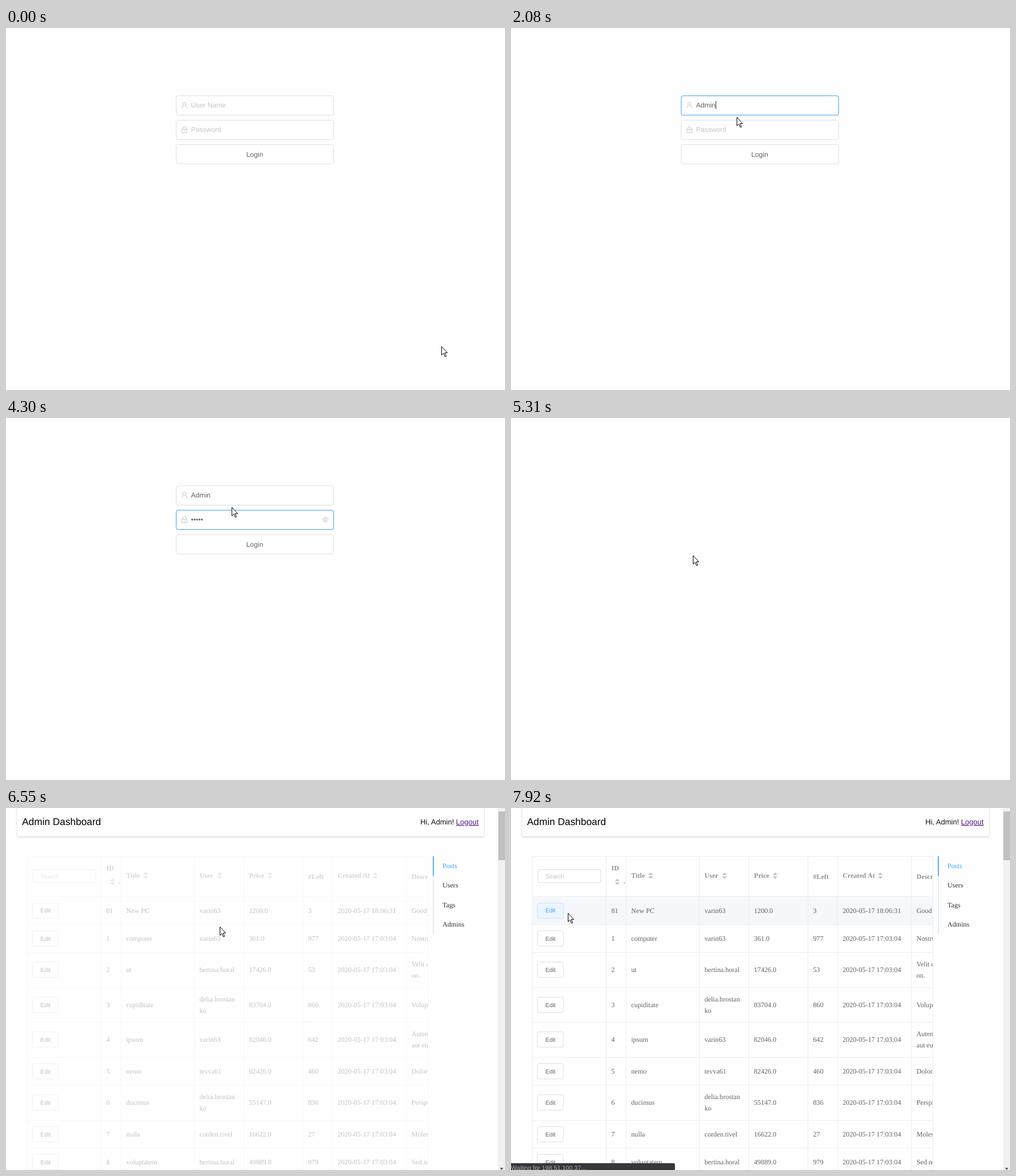
An HTML page that plays this animation: 878 px wide and 638 px high, repeating every 8000 ms.

```html
<!DOCTYPE html>
<html lang="en">
<head>
<meta charset="utf-8">
<title>Admin login</title>
<style>
html, body { margin: 0; width: 100%; height: 100%; overflow: hidden; background: #fefefe; }
svg { display: block; width: 878px; height: 638px; }
text { font: 12.14px "Liberation Sans", Arial, sans-serif; fill: #606266; white-space: pre; text-rendering: geometricPrecision; }
.serif text { font-family: "Liberation Serif", "Times New Roman", serif; }
.serif .head { font-weight: bold; fill: #909399; }
.serif .menu { fill: #303133; }
.serif .on { fill: #409eff; }
.serif .small { font: 10.4px "Liberation Sans", Arial, sans-serif; }
.hint, .serif .hint { fill: #c0c4cc; }
.mid { text-anchor: middle; }
.box { fill: #fff; stroke: #dcdfe6; }
.icon { fill: none; stroke: #c0c4cc; }
.line { fill: none; stroke: #ebeef5; }
.hot rect { fill: #ecf5ff; stroke: #c6e2ff; }
.serif .hot text, .hot text { fill: #409eff; }
.bar { fill: #fff; filter: drop-shadow(0 1.7px 1.7px rgba(0,0,0,.2)); }
.cursor { fill: #fff; stroke: #000; stroke-linejoin: round; }
</style>
</head>
<body>
<svg id="stage" viewBox="0 0 878 638"></svg>
<script>
const stage = document.getElementById('stage');
const $ = id => document.getElementById(id);
const snap = v => Math.floor(v) + .5;
const text = (x, y, s, cls = '', more = '') => `<text x="${x}" y="${Math.round(y)}" class="${cls}" ${more}>${s}</text>`;
const rect = (x, y, w, h, cls, more = '') => `<rect x="${x}" y="${y}" width="${w}" height="${h}" class="${cls}" ${more}/>`;
const path = (d, cls, more = '') => `<path d="${d}" class="${cls}" ${more}/>`;

// ---- login form ----
const field = (name, y, hint, icon) => `
  ${rect(299.5, y + .5, 277, 34, 'box', 'rx="3"')}
  ${rect(299.5, y + .5, 277, 34, '', `rx="3" id="${name}Ring" fill="none"`)}
  ${path(icon, 'icon')}
  ${text(325.5, y + 21, hint, 'hint', `id="${name}Hint"`)}
  ${text(325.5, y + 21, '', '', `id="${name}Text"`)}`;

const login = `<g id="login">
  ${field('user', 119, 'User Name', 'M311 133.7a2.8 2.8 0 1 0 5.6 0a2.8 2.8 0 1 0-5.6 0M309.3 141.2q.4-3.4 3.2-4.4M318.5 141.2q-.4-3.4-3.2-4.4')}
  ${field('pass', 162, 'Password', 'M309.5 178.5h9v6h-9zM311 178.3v-1.5a3 3 0 0 1 6 0v1.5M314 180.3v2.3')}
  ${path('M556.3 179.2q5.6-8.6 11.2 0q-5.6 8.6-11.2 0zM559.9 179.2a2 2 0 1 0 4 0a2 2 0 1 0-4 0', 'icon', 'id="eye"')}
  <g id="loginBtn">${rect(299.5, 205.5, 277, 34, 'box', 'rx="3"')}${text(437.7, 227, 'Login', 'mid')}</g>
  ${rect(0, 0, 1, 14, '', 'id="caret" fill="#303133"')}
</g>`;

// ---- dashboard ----
const cols = [37.5, 167.5, 202.5, 331.5, 418.5, 522.5, 574.5, 704.5];
const rows = [
  ['81', 'New PC', 'varin63', '1200.0', '3', 'Good one'],
  ['1', 'computer', 'varin63', '361.0', '977', 'Nostrum'],
  ['2', 'ut', 'bertina.horal', '17426.0', '53', 'Velit qui|on.'],
  ['3', 'cupiditate', 'delia.brostan|ko', '83704.0', '860', 'Voluptas'],
  ['4', 'ipsum', 'varin63', '82046.0', '642', 'Autem et|aut eum'],
  ['5', 'nemo', 'tevva61', '82426.0', '460', 'Dolorem'],
  ['6', 'ducimus', 'delia.brostan|ko', '55147.0', '836', 'Perspici'],
  ['7', 'nulla', 'corden.tivel', '16622.0', '27', 'Molestiae'],
  ['8', 'voluptatem', 'bertina.horal', '49889.0', '979', 'Sed non']
];

function cell(col, mid, s) {
  const lines = s.split('|');
  return lines.map((line, i) => text(cols[col] + 9, mid + 3.8 + (i * 2 - lines.length + 1) * 9.9, line)).join('');
}

const sorter = (x, y) => path(`M${x - 4.3} ${y - 1.2}h8.6l-4.3-4.4zM${x - 4.3} ${y + 1.2}h8.6l-4.3 4.4z`, '', 'fill="#c0c4cc"');

function table() {
  const heads = [['ID', 1, 110], ['Title', 2, 123], ['User', 3, 123], ['Price', 4, 123],
    ['#Left', 5, 125], ['Created At', 6, 123], ['Description', 7, 125]];
  let out = rect(38, 156, 704.5, 49.4, '', 'id="rowHover" fill="#f5f7fa"');
  out += heads.map(([s, c, y]) => text(cols[c] + 9, y, s, 'head')).join('');
  out += [[187, 130], [245.7, 119.3], [375.7, 119.3], [464.7, 119.3], [650, 119.3]].map(p => sorter(...p)).join('');
  out += text(198, 133, '.', 'head');
  out += rect(47.5, 108.5, 110.5, 23, 'box', 'rx="2.5"') + text(60.7, 124, 'Search', 'small hint');
  let y = 156, lines = 'M37.5 85.5H742.5V638M37.5 155.5H742';
  rows.forEach((row, i) => {
    const h = row.join('').includes('|') ? 61.5 : 49.4, mid = y + h / 2;
    const cells = [...row.slice(0, 5), i ? '2020-05-17 17:03:04' : '2020-05-17 18:06:31', row[5]];
    out += `<g id="edit${i}">${rect(46.5, snap(mid - 13.6), 45.5, 27, 'box', 'rx="2.5"')}${text(69.5, mid + 3.7, 'Edit', 'small mid')}</g>`;
    out += cells.map((s, c) => cell(c + 1, mid, s)).join('');
    y += h;
    lines += `M37.5 ${snap(y)}H742`;
  });
  return out + path(lines + cols.map(x => `M${x} 85.5V638`).join(''), 'line');
}

const menu = ['Posts', 'Users', 'Tags', 'Admins'].map((s, i) =>
  text(768, 105.5 + i * 34.6, s, i ? 'menu' : 'on')).join('');

const dash = `<g id="dash">
  ${rect(19.5, -10, 821.5, 60, 'bar', 'id="bar"')}
  ${text(28.3, 30, 'Admin Dashboard', '', 'style="font-size:17.35px;fill:#000"')}
  <g id="right">
    <text x="729" y="29" style="font-size:13px;fill:#111">Hi, Admin! <tspan fill="#551a8b" text-decoration="underline">Logout</tspan></text>
    <g class="serif">${rect(751, 85, 1.7, 138, '', 'fill="#e4e7ed"')}${rect(751, 85, 1.7, 34.5, '', 'fill="#409eff"')}${menu}</g>
  </g>
  <clipPath id="view">${rect(30, 80, 713, 558, '')}</clipPath>
  <g id="table" class="serif" clip-path="url(#view)">${table()}</g>
  <g id="scroll">
    ${rect(865.5, 0, 12.5, 638, '', 'fill="#f1f1f1"')}${rect(866.3, 6, 11.7, 86, '', 'fill="#c1c1c1"')}
    ${path('M868.8 634.2h6.6l-3.3 3.5z', '', 'fill="#505050"')}
  </g>
  <g id="status">${path('M0 626h285.5q3 0 3 3v9H0z', '', 'fill="#36373b"')}
    ${text(0, 638, 'Waiting for 198.51.100.37...', '', 'style="font-size:10.8px;fill:#a6abb1"')}</g>
</g>`;

const cursors = `<g id="cursor" class="cursor">
  ${path('M.5.5v15l3.4-3.3 2.6 6 2.1-.9-2.6-5.9h4.5z', '', 'id="arrow"')}
  ${path('M-3.5-6.5h2.5l1 .8 1-.8h2.5M0-5.7V5.8M-3.5 6.5h2.5l1-.7 1 .7h2.5', '', 'id="beam" fill="none"')}
  ${path('M-1 11V1.7q0-1.2 1-1.2t1 1.2V7q0-1 1.2-1t1.2 1v.8q0-.9 1.1-.9t1.1 1v.8q0-.8 1-.8t1 1v4.5q0 1.8-1 3v1.6h-5.6v-1.4l-4.5-5.1q-1-1.5 0-1.9t2.5 1.4z', '', 'id="hand"')}
</g>`;

stage.innerHTML = login + dash + cursors;

// ---- timing ----
// The screen refreshes only at these moments.
const ticks = [0, 130, 240, 370, 490, 600, 740, 850, 990, 1100, 1590, 1840, 1950, 2080, 2200, 2320, 2570,
  2950, 3060, 3200, 3450, 3570, 3690, 4300, 4940, 5080, 5200, 5310, 5940, 6050, 6190, 6310, 6430, 6550,
  6680, 6800, 6930, 7050, 7190, 7300, 7420, 7540, 7680, 7800, 7920];

// Pointer path: time, x, y
const route = [[0, 766, 561], [130, 735, 530], [370, 470, 225], [490, 420, 180], [600, 398, 150], [850, 398, 150],
  [990, 397, 157], [4300, 397, 157], [4940, 370, 157], [5080, 338, 213], [5200, 323, 236], [5310, 320, 242],
  [5940, 320, 242], [6550, 376, 209], [6800, 404, 195], [6930, 464, 177], [7050, 398, 180],
  [7420, 110, 187], [7540, 72, 184], [7800, 72, 184], [7920, 100, 185]];

const ramp = (t, a, b) => Math.max(0, Math.min(1, (t - a) / (b - a)));
const count = (t, times) => times.filter(s => t >= s).length;
const show = (id, on) => $(id).setAttribute('visibility', on ? 'inherit' : 'hidden');
const fade = (id, v) => $(id).setAttribute('opacity', v);

function pointer(t) {
  const i = route.findIndex(p => p[0] > t);
  if (i < 0) return route[route.length - 1].slice(1);
  const a = route[i - 1], b = route[i], k = ramp(t, a[0], b[0]);
  return [1, 2].map(n => Math.round(a[n] + (b[n] - a[n]) * k));
}

function fill(name, value, focus, hover) {
  $(name + 'Text').textContent = value;
  show(name + 'Hint', !value);
  $(name + 'Ring').setAttribute('stroke', focus ? '#409eff' : '#c0c4cc');
  fade(name + 'Ring', focus || (hover ? 1 : 0));
}

function drawLogin(t, x, y) {
  const over = top => x > 299 && x < 577 && y >= top && y < top + 35;
  const inPass = t >= 2200;
  const name = 'Admin'.slice(0, count(t, [1100, 1590, 1840, 1950, 2080]));
  const dots = t < 3060 ? count(t, [2570, 2950])
    : count(t, [3200, 3450, 3570, 3570, 3690]);
  fill('user', name, inPass ? 0 : ramp(t, 640, 900), over(119) && t > 700);
  fill('pass', '•'.repeat(dots), ramp(t, 2100, 2320), over(162));
  show('eye', inPass);
  const active = $(inPass ? 'passText' : 'userText');
  const width = active.textContent ? active.getComputedTextLength() : 0;
  $('caret').setAttribute('x', Math.round(325.5 + width));
  $('caret').setAttribute('y', inPass ? 172 : 129);
  show('caret', t >= 850 && t < 4300);
  const hot = over(205);
  $('loginBtn').setAttribute('class', hot ? 'hot' : '');
  return hot ? 'hand' : over(119) || over(162) ? 'beam' : 'arrow';
}

function drawDash(t, x, y) {
  const ready = t >= 6190;
  $('bar').setAttribute('width', ready ? 821.5 : 834.5);
  $('right').setAttribute('transform', `translate(${ready ? 0 : 13})`);
  show('table', ready);
  show('scroll', ready);
  fade('table', .1 + .9 * ramp(t, 6440, 6795));
  fade('rowHover', ramp(t, 6800, 7050));
  $('edit0').setAttribute('class', t >= 7540 ? 'hot' : '');
  show('status', t >= 7800);
  fade('status', ramp(t, 7700, 7900));
  return x > 47 && x < 92 && y > 167 && y < 195 ? 'hand' : 'arrow';
}

function draw(now) {
  const t = ticks[count(now, ticks) - 1];
  const [x, y] = pointer(t);
  const onLogin = t < 5310, onDash = t >= 5940;
  // Hidden screens take no part in layout, so their children stay hidden too.
  $('login').setAttribute('display', onLogin ? 'inline' : 'none');
  $('dash').setAttribute('display', onDash ? 'inline' : 'none');
  const shape = onLogin ? drawLogin(t, x, y) : onDash ? drawDash(t, x, y) : 'arrow';
  ['arrow', 'beam', 'hand'].forEach(id => show(id, id === shape));
  $('cursor').setAttribute('transform', `translate(${x} ${y})`);
}

let start;
function loop(now) {
  start ??= now;
  draw((now - start) % 8000);
  requestAnimationFrame(loop);
}
draw(0);
requestAnimationFrame(loop);
</script>
</body>
</html>
```
